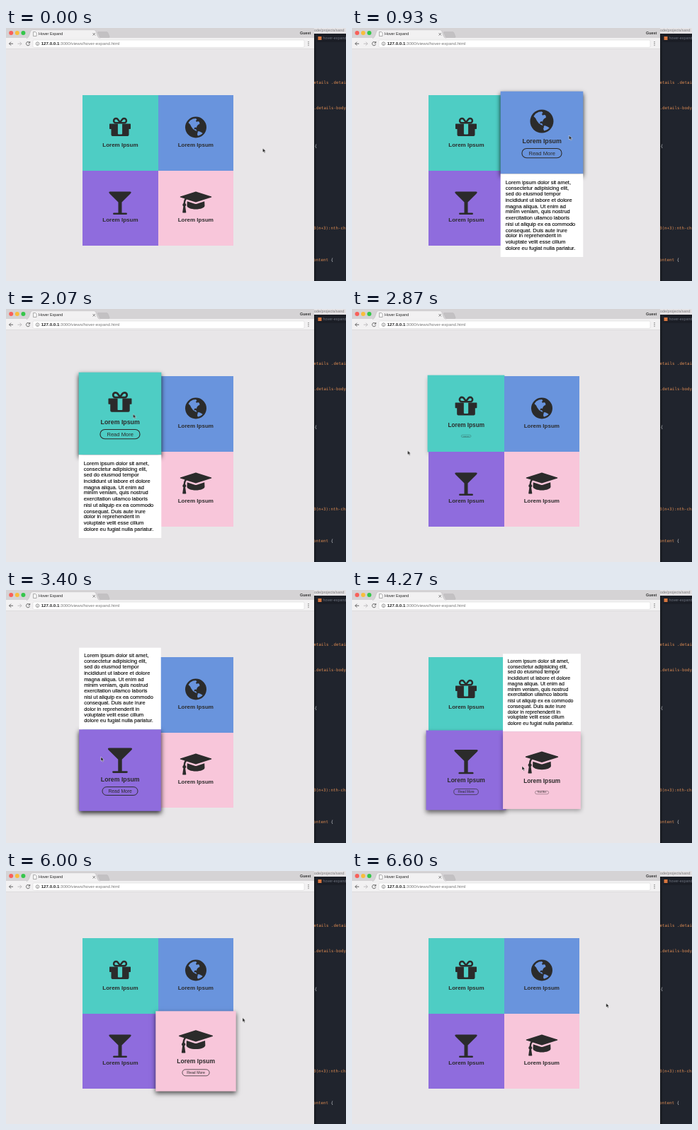
An HTML page that plays this animation: 480x358 px, repeating every 6.87 s.

```html
<!DOCTYPE html>
<html lang="en">
<head>
<meta charset="utf-8">
<title>Hover Expand</title>
<style>
@property --p { syntax: "<number>"; inherits: true; initial-value: 0; }

html, body { margin: 0; width: 100%; height: 100%; overflow: hidden; }
body { position: relative; background: #e8e6e8; font-family: "Liberation Sans", Arial, sans-serif; }
#stage { position: absolute; left: 0; top: 0; width: 480px; height: 358px; overflow: hidden; }
#chrome { position: absolute; left: 0; top: 0; }
.code { font: 5.8px "DejaVu Sans Mono", monospace; fill: #dc8a52; }

#grid { position: absolute; left: 108.2px; top: 95.4px; isolation: isolate; }
.tile {
  --body: hidden;
  position: absolute; z-index: 0; width: 106.4px; height: 106.4px;
  color: #2b2b2b;
  transform: scale(calc(1 + .1 * var(--p)));
  box-shadow: 0 3px 6px rgba(0, 0, 0, calc(.9 * var(--p)));
}
.face { position: absolute; inset: 0; transform: translateY(calc(-6px * var(--p))); }
.face svg { position: absolute; left: 50%; top: 27.2px; transform: translateX(-50%); }
.title, .more { position: absolute; left: 0; right: 0; margin: auto; text-align: center; white-space: nowrap; }
.title { top: 65.6px; font: bold 8px/10px "Liberation Sans", Arial, sans-serif; }
.more {
  top: 79px; width: 52.3px; height: 13.4px; box-sizing: border-box;
  border: 1px solid; border-radius: 7px;
  font-size: 6.9px; line-height: 11.4px;
  transform: scale(var(--p));
}
.body {
  position: absolute; left: 0; top: 100%; width: 100%; height: 100%;
  box-sizing: border-box; padding: 6.4px;
  background: #fff; color: #000;
  font-size: 6.8px; line-height: 7.73px; white-space: pre;
  -webkit-text-stroke: .1px;
  visibility: var(--body);
}
.low .body { top: -100%; }

.gift  { left: 0; top: 0; background: #4ecdc4; animation: gift 6.87s ease infinite, gift-on 6.87s step-end infinite; }
.globe { left: 106.4px; top: 0; background: #6994dd; animation: globe 6.87s ease infinite, globe-on 6.87s step-end infinite; }
.glass { left: 0; top: 106.4px; background: #8f6cdd; animation: glass 6.87s ease infinite, glass-on 6.87s step-end infinite; }
.cap   { left: 106.4px; top: 106.4px; background: #f8c6da; animation: cap 6.87s ease infinite, cap-on 6.87s step-end infinite; }

/* hover progress: half a second each way */
@keyframes globe { 0%, 5.82%, 29.11%, 100% { --p: 0; } 13.1%, 21.83% { --p: 1; } }
@keyframes gift  { 0%, 21.83%, 45.85%, 100% { --p: 0; } 29.11%, 38.57% { --p: 1; } }
@keyframes glass { 0%, 44.98%, 67.78%, 100% { --p: 0; } 52.26%, 60.5% { --p: 1; } }
@keyframes cap   { 0%, 60.5%, 93.16%, 100% { --p: 0; } 67.78%, 85.88% { --p: 1; } }

/* text panel and stacking switch at once */
@keyframes globe-on { 0%, 21.83%, 100% { z-index: 0; --body: hidden; } 5.82% { z-index: 5; --body: visible; } }
@keyframes gift-on  { 0%, 38.57%, 100% { z-index: 0; --body: hidden; } 21.83% { z-index: 5; --body: visible; } }
@keyframes glass-on { 0%, 60.5%, 100% { z-index: 0; --body: hidden; } 44.98% { z-index: 5; --body: visible; } }
@keyframes cap-on   { 0%, 85.88%, 100% { z-index: 0; --body: hidden; } 60.5% { z-index: 5; --body: visible; } }

#cursor { position: absolute; left: 0; top: 0; z-index: 1; overflow: visible; animation: cursor 6.87s linear infinite; }
@keyframes cursor {
  0%, 3.93% { transform: translate(362.5px, 170px); }
  5.82% { transform: translate(320px, 162px); }
  8.73% { transform: translate(308px, 154px); }
  13.54% { transform: translate(306.5px, 152px); }
  18.2% { transform: translate(285px, 152px); }
  21.83% { transform: translate(209px, 150px); }
  24.75%, 34.93% { transform: translate(179.5px, 148.5px); }
  38.57% { transform: translate(102px, 165px); }
  41.19% { transform: translate(73px, 195px); }
  44.98% { transform: translate(108px, 228px); }
  48.03%, 49.5% { transform: translate(134px, 236px); }
  55.31% { transform: translate(150px, 240px); }
  60.5% { transform: translate(220px, 246.5px); }
  62.15% { transform: translate(240px, 249px); }
  66.96%, 79.62% { transform: translate(249px, 251px); }
  85.88% { transform: translate(326px, 215px); }
  89.23% { transform: translate(344px, 198px); }
  94.61%, 100% { transform: translate(358.7px, 187px); }
}
</style>
</head>
<body>
<div id="stage">
  <svg id="chrome" width="480" height="358">
    <defs>
      <linearGradient id="edge">
        <stop offset="0" stop-color="#14171c"/>
        <stop offset="1" stop-color="#20242d"/>
      </linearGradient>
    </defs>
    <!-- editor -->
    <rect x="435" width="45" height="358" fill="#20242d"/>
    <rect x="435" y="8" width="45" height="12" fill="#1b1e26"/>
    <rect x="435" y="8" width="4" height="350" fill="url(#edge)"/>
    <rect x="435" width="45" height="8" fill="#e3e1e3"/>
    <text x="435" y="5" font-size="5.4" fill="#7d7b7d">ode/projects/sand</text>
    <rect x="440.5" y="12" width="5" height="5" fill="#d9773f"/>
    <text x="447.5" y="16.3" font-size="5.4" fill="#6f7580">hover-expand.html</text>
    <g class="code">
      <text x="434.5" y="79">etails .details</text>
      <text x="434.5" y="115">.details-body</text>
      <text x="435.5" y="169" fill="#c9ccd2">{</text>
      <text x="434" y="285">3(n+3):nth-child</text>
      <text x="434" y="329.5">ontent <tspan fill="#c9ccd2">{</tspan></text>
    </g>
    <!-- browser bar -->
    <rect y="14" width="435" height="344" fill="#e8e6e8"/>
    <rect width="435" height="15" fill="#d5d3d5"/>
    <rect y="14" width="435" height="15.5" fill="#f2f1f2"/>
    <path d="M0 29.5H435" stroke="#d6d4d6" stroke-width=".6"/>
    <path d="M29 14.5Q31.5 14 32.5 11L34.5 5Q35.3 2.6 37.5 2.6H124Q126.2 2.6 127 5L129 11Q130 14 132.5 14.5Z" fill="#f2f1f2" stroke="#b9b7b9" stroke-width=".5"/>
    <path d="M30 14.6H132" stroke="#f2f1f2"/>
    <path d="M130 5.5H142Q143.5 5.5 144 7L146 12Q146.5 13.5 145 13.5H134Q132.5 13.5 132 12L129.7 7Q129 5.5 130 5.5Z" fill="#c3c1c3" stroke="#b3b1b3" stroke-width=".4"/>
    <circle cx="7.2" cy="7" r="3" fill="#f8605a"/>
    <circle cx="15.8" cy="7" r="3" fill="#f9bd3c"/>
    <circle cx="24.4" cy="7" r="3" fill="#35c64b"/>
    <path d="M38.5 5.5H41.5L43 7V11.5H38.5Z" fill="#fff" stroke="#777" stroke-width=".6"/>
    <text x="46" y="10.2" font-size="5.4" fill="#222">Hover Expand</text>
    <path d="M122.5 7L126 10.5M126 7L122.5 10.5" stroke="#666" stroke-width=".8"/>
    <text x="415" y="9" font-size="5.4" font-weight="bold" fill="#333">Guest</text>
    <rect x="38" y="17" width="383" height="10.5" rx="1.5" fill="#fff" stroke="#d2d0d2" stroke-width=".5"/>
    <g fill="none" stroke="#555" stroke-width=".9">
      <path d="M10 22.2H4.5M7 19.7L4.5 22.2L7 24.7"/>
      <path d="M16.5 22.2H22M19.5 19.7L22 22.2L19.5 24.7" stroke="#b9b7b9"/>
      <path d="M33.2 20.7A2.6 2.6 0 1 0 33.5 23M33.7 19V21.2H31.5"/>
      <circle cx="44.5" cy="22.2" r="2.3" stroke-width=".6"/>
      <path d="M44.5 21.8V23.6M44.5 20.7V21.2" stroke-width=".6"/>
    </g>
    <text x="49.7" y="24.3" font-size="6.15" fill="#777"><tspan font-weight="bold" fill="#222">127.0.0.1</tspan>:3000/views/hover-expand.html</text>
    <g fill="#666">
      <circle cx="427" cy="19.8" r=".7"/><circle cx="427" cy="22.2" r=".7"/><circle cx="427" cy="24.6" r=".7"/>
    </g>
  </svg>

  <div id="grid"></div>

  <svg id="cursor" width="6" height="8">
    <path d="M0 0V6L1.4 4.8L2.4 7L3.4 6.5L2.5 4.4H4.2Z" fill="#111" stroke="#fff" stroke-width=".5"/>
  </svg>
</div>

<script>
const lorem = [
  "Lorem ipsum dolor sit amet,", "consectetur adipisicing elit,", "sed do eiusmod tempor",
  "incididunt ut labore et dolore", "magna aliqua. Ut enim ad", "minim veniam, quis nostrud",
  "exercitation ullamco laboris", "nisi ut aliquip ex ea commodo", "consequat. Duis aute irure",
  "dolor in reprehenderit in", "voluptate velit esse cillum", "dolore eu fugiat nulla pariatur."
].join("\n");

const icons = {
  gift: `<g transform="translate(2.5 3.75)">
    <path fill-rule="evenodd" d="M0 9.4q0-.6.6-.6h28.8q.6 0 .6.6v6.2q0 .6-.6.6h-1.9v8.1q0 1.9-1.9 1.9H4.4q-1.9 0-1.9-1.9v-8.1H.6q-.6 0-.6-.6zM11.9 8.8V23q0 .8 1.2.8h3.8q1.2 0 1.2-.8V8.8z"/>
    <path fill="none" stroke="currentColor" stroke-width="2.5" d="M9.2 7.5a3.1 3.1 0 0 1 0-6.2q1.6 0 2.4 1L15 6.7l3.4-4.4q.9-1 2.4-1a3.1 3.1 0 0 1 0 6.2z"/></g>`,
  globe: `<g transform="translate(17.5 17.5)"><circle r="15"/>
    <g fill="#6994dd">
      <path d="M-10.5-6.5L-8-9.8-4-12 0-12.6 1.5-11 0-9.5 1-7.5 3-8.5 5-7.5 5.4-4.8 3-3.5 1.5-1.5 1 .5-1 0-2.5 1.5-2 3 0 2.5 1.5 5.5-1 4.5-4 2.5-6.5-1-8-4z"/>
      <path d="M2.9 12.2Q6.8 11.5 9.7 8.5L8 7.2 5.5 6 3.5 5.5 2.5 6.5 2.6 8 1.9 9.5z"/>
    </g></g>`,
  glass: `<path d="M33.2 3.6q0 .7-.9 1.6L20 17.5v15h6.2a1.25 1.25 0 0 1 0 2.5H8.8a1.25 1.25 0 0 1 0-2.5H15v-15L2.7 5.2q-.9-.9-.9-1.6 0-1.1 1.9-1.1h27.6q1.9 0 1.9 1.1z"/>`,
  cap: `<path d="M0 10q0-.5.4-.6L22.3 2.5h.4L44.6 9.4q.4.1.4.6t-.4.6L22.7 17.5h-.4L9.6 13.5Q7.9 14.5 7.5 19.1 8.8 19.8 8.8 21.2 8.8 22.6 7.6 23.3L8.8 31.8q0 .7-.6.7H4.3q-.6 0-.6-.7L4.9 23.3Q3.8 22.6 3.8 21.2 3.8 19.8 5 19.1 5.2 15 7 12.6L.4 10.6Q0 10.4 0 10z"/>
    <path d="M34.7 16.3L35 22.5C35 25.2 29.4 27.5 22.5 27.5S10 25.2 10 22.5L10.3 16.3 21.6 19.9q.9.3 1.8 0z"/>`
};

const tile = (name, width, low) => `
  <div class="tile ${name} ${low}">
    <div class="body">${lorem}</div>
    <div class="face">
      <svg width="${width}" height="35" fill="currentColor">${icons[name]}</svg>
      <div class="title">Lorem Ipsum</div>
      <div class="more">Read More</div>
    </div>
  </div>`;

document.getElementById("grid").innerHTML =
  tile("gift", 35, "") + tile("globe", 35, "") + tile("glass", 35, "low") + tile("cap", 45, "low");
</script>
</body>
</html>
```
